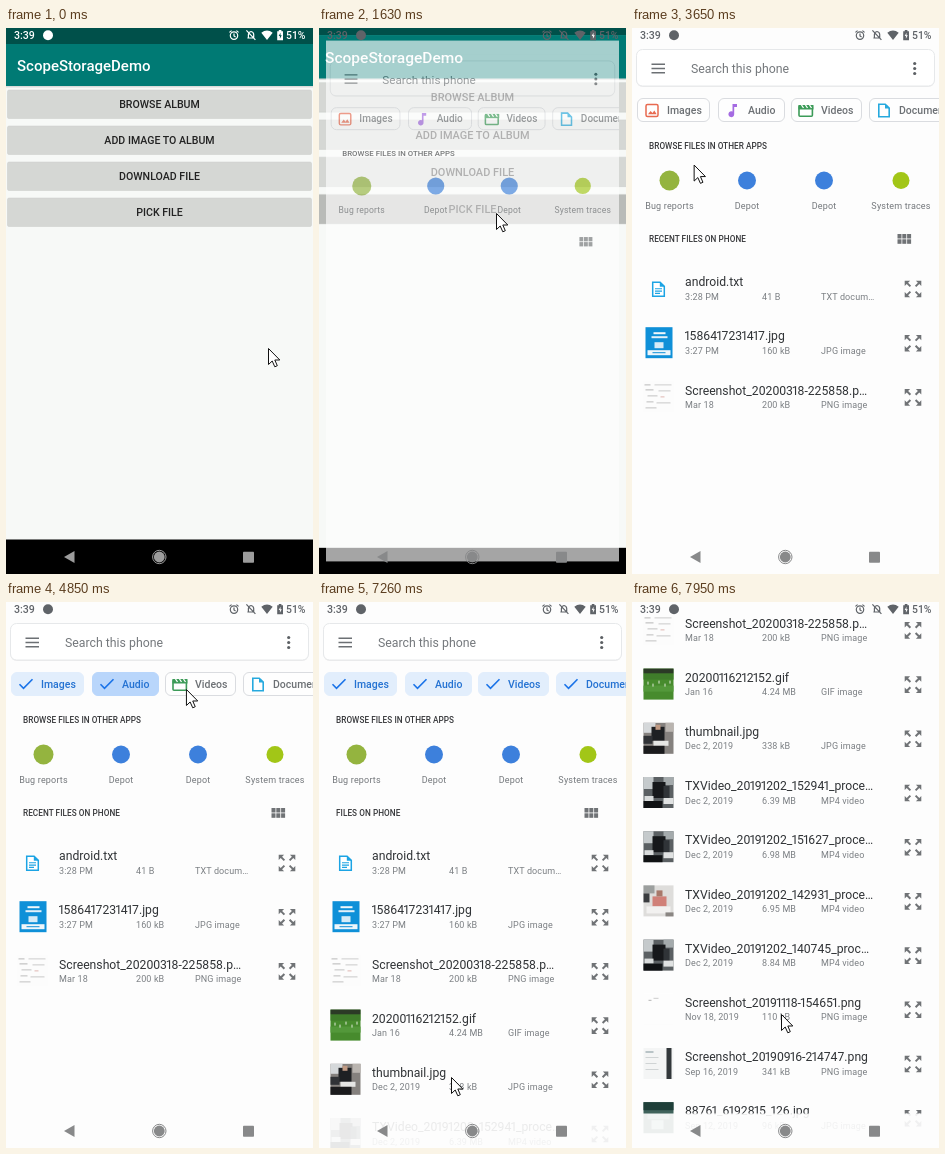
These frames come from a looping animation (307x546 px, 8 s). An HTML page:

```html
<!DOCTYPE html>
<html lang="en">
<head>
<meta charset="utf-8">
<title>File picker demo</title>
<style>
html, body { margin: 0; width: 100%; height: 100%; overflow: hidden; background: #fff; }
svg { display: block; width: 100%; height: 100%; font-family: Roboto, "Noto Sans", sans-serif; cursor: default; }
.med { font-weight: 500; }
.meta { font-size: 9px; letter-spacing: .12px; fill: #7b7f83; }
.app { font-size: 9px; letter-spacing: .18px; fill: #74787c; text-anchor: middle; }
.head { font-size: 8.2px; letter-spacing: .06px; font-weight: 500; fill: #36373a; }
.chip { font-size: 10.5px; font-weight: 500; }
.btn { font-size: 10.6px; font-weight: 500; fill: #222; text-anchor: middle; }
</style>
</head>
<body>
<svg id="stage" viewBox="0 0 307 546"></svg>
<script>
const LOOP = 8000;
const ROW = 54.2;

// Bursts of screen updates: start, end, number of steps
const BURSTS = [[0, 0, 1], [150, 1090, 8], [1360, 2170, 7], [2420, 2850, 4], [3250, 3250, 1],
  [3530, 3910, 4], [4190, 5150, 8], [5400, 6360, 8], [6510, 7530, 9], [7680, 7950, 3]];

// Pointer path: time, x, y, ease-out power (0 = ease in and out)
const PATH = [[0, 262, 320, 0], [1090, 177, 184, 0], [1360, 177, 185, 0], [2280, 177, 185, 0],
  [2850, 121, 414, 0], [3240, 120, 414, 0], [3390, 120, 414, 0], [3910, 51, 86, 2.6],
  [4190, 51, 86, 0], [4590, 117, 86, 0], [4876, 180, 87, 1], [5150, 197, 86, 2],
  [5400, 197, 86, 0], [5800, 265, 85, 0], [5860, 265, 85, 0], [6086, 222, 189, 1],
  [6360, 204, 268, 2], [6500, 204, 268, 0], [7275, 132, 475, 0], [7402, 139, 450, 1], [7530, 149, 412, 1]];

const CHIPS = [
  { name: "Images", x: 5, w: 73, click: 4190, icon: `<rect x="1" y="1.5" width="12" height="12" rx="1.5" fill="none" stroke="#e8694f" stroke-width="1.5"/><path d="M3 11.3l2.6-3.4 1.9 2.2 1.8-2.6 2.4 3.8z" fill="#e8694f"/>` },
  { name: "Audio", x: 86, w: 67, click: 4590, icon: `<path d="M6.5 1h4.5v3H8.2v7.2a2.9 2.9 0 1 1-1.7-2.6z" fill="#a56be2"/>` },
  { name: "Videos", x: 159, w: 71, click: 5400, icon: `<rect x="0" y="2.8" width="13.4" height="10.4" rx="1" fill="none" stroke="#3c9b58" stroke-width="1.6"/><path d="M-.5 2h15v4.5h-15z" fill="#3c9b58"/><path d="M2.5 2l2 3M6.5 2l2 3M10.5 2l2 3" stroke="#fff" stroke-width="1.3"/>` },
  { name: "Documents", x: 237, w: 92, click: 5800, icon: `<path d="M1.8 1.2h6.4l4 4v8.6H1.8z" fill="none" stroke="#26a9de" stroke-width="1.6"/><path d="M8 1.2v4.4h4.2z" fill="#26a9de"/>` }
];

// Thumbnails: flat blocks "colour x y w h" on a 30 x 31 tile
const DESK = "#5b6063 0 0 30 31;#c5cacc 0 0 10 12;#a4aaac 20 0 10 8;#16181b 9 5 13 16;#303438 20 9 6 13;#d9dcdc 1 19 9 5;#101214 0 24 19 7;#e0e2e2 20 21 10 6";
const SHEET = "#fcfcfc 0 0 30 31;#b9b9b9 1 3 6 1;#cdcdcd 11 3 17 1;#b7b7b7 2 8 8 1;#cacaca 15 9 12 1;#c2c2c2 4 14 10 1;#dfb7b2 17 15 4 1;#bdbdbd 3 20 7 1;#c9c9c9 13 21 14 1;#c2c2c2 2 26 11 1";
const FILES = [
  ["android.txt", "3:28 PM", "41 B", "TXT docum…", ""],
  ["1586417231417.jpg", "3:27 PM", "160 kB", "JPG image", "#0f90d8 2 0 27 31;#f0f7fb 10 5 12 2;#e3f1f9 8 9 16 2;#d5ebf7 11 15 9 6;#eef6fb 4 23 23 5;#0f90d8 9 25 13 1"],
  ["Screenshot_20200318-225858.p…", "Mar 18", "200 kB", "PNG image", SHEET],
  ["20200116212152.gif", "Jan 16", "4.24 MB", "GIF image", "#478b2d 0 0 30 31;#2b3a26 0 0 30 5;#3f7d2a 0 5 30 6;#53983a 0 17 30 6;#dfe9d8 4 13 1 3;#dfe9d8 9 15 1 3;#dfe9d8 15 12 1 3;#dfe9d8 21 15 1 3;#dfe9d8 26 12 1 3"],
  ["thumbnail.jpg", "Dec 2, 2019", "338 kB", "JPG image", "#85817e 0 0 30 31;#d5d8da 0 0 12 10;#1e2023 8 4 13 14;#c09a83 12 2 5 5;#303236 0 13 9 8;#e6e6e4 10 18 15 5;#1b1b1d 0 23 21 8;#b9b4af 22 0 8 9"],
  ["TXVideo_20191202_152941_proce…", "Dec 2, 2019", "6.39 MB", "MP4 video", DESK],
  ["TXVideo_20191202_151627_proce…", "Dec 2, 2019", "6.98 MB", "MP4 video", DESK],
  ["TXVideo_20191202_142931_proce…", "Dec 2, 2019", "6.95 MB", "MP4 video", "#dedddb 0 0 30 31;#9c9f9e 0 0 11 8;#3a3c3f 0 8 6 9;#d08078 9 11 14 10;#a8786a 13 5 6 6;#f2f1f0 3 21 24 7;#8a8683 22 27 8 4"],
  ["TXVideo_20191202_140745_proc…", "Dec 2, 2019", "8.84 MB", "MP4 video", DESK],
  ["Screenshot_20191118-154651.png", "Nov 18, 2019", "110 kB", "PNG image", "#fdfdfd 0 0 30 31;#b5b5b5 5 6 3 1;#cecece 10 4 5 1"],
  ["Screenshot_20190916-214747.png", "Sep 16, 2019", "341 kB", "PNG image", "#f4f5f5 0 0 30 31;#b9c4c7 2 3 8 2;#d0d4d5 2 9 13 1;#d0d4d5 2 15 11 1;#d0d4d5 2 21 13 1;#33383b 23 0 5 31"],
  ["88761_6192815_126.jpg", "Sep 12, 2019", "96 kB", "JPG image", "#3f625b 0 0 30 31;#1f3f39 0 0 30 8;#7e9f98 4 12 22 5;#acc4bf 8 18 12 9"]
];

const rect = (x, y, w, h, fill, extra = "") => `<rect x="${x}" y="${y}" width="${w}" height="${h}" fill="${fill}" ${extra}/>`;
const text = (x, y, s, attrs) => `<text x="${x}" y="${y}" ${attrs}>${s}</text>`;
const dot = (x, y, r, fill) => `<circle cx="${x}" cy="${y}" r="${r}" fill="${fill}"/>`;

// File names use a narrow figure one
function narrowOnes(s) {
  return [...s].map((c, i) => (c === "1" ? -1.1 : 0) - (s[i - 1] === "1" ? 1.2 : 0)).join(" ");
}

function thumb(spec) {
  return spec.split(";").map(b => {
    const [fill, x, y, w, h] = b.split(" ");
    return rect(+x + 11.5, +y + 245, w, h, fill);
  }).join("");
}

const docIcon = `<path d="M20.7 254.2h7.4l4.2 4.2v9.8h-11.6z" fill="#fff" stroke="#1ca4e4" stroke-width="1.5"/><path d="M23 260.8h7M23 263.1h7M23 265.4h5" stroke="#1ca4e4" stroke-width="1.1"/><path d="M27.8 254v4.7h4.7z" fill="#1ca4e4"/>`;
const corner = `<path d="M-8.3-8.3h5.4l-2 2 3 3-1.4 1.4-3-3-2 2z"/>`;
const expand = `<g transform="translate(281 261)" fill="#707376">` +
  [0, 90, 180, 270].map(a => `<g transform="rotate(${a})">${corner}</g>`).join("") + `</g>`;

function fileRow([name, date, size, kind, tile], i) {
  return `<g class="row" transform="translate(0 ${i * ROW})">
    <g class="tile">${tile ? thumb(tile) : docIcon}</g>
    ${text(53, 258.3, name, `font-size="12.2" fill="#303336" dx="${narrowOnes(name)}"`)}
    ${text(53, 271.5, date, 'class="meta"')}${text(130, 271.5, size, 'class="meta"')}${text(189, 271.5, kind, 'class="meta"')}
    ${expand}</g>`;
}

function chip({ name, x, w, icon }) {
  return `<g class="pill"><rect x="${x + .5}" y="70.5" width="${w - 1}" height="23" rx="5.5"/>
    <g class="kind" transform="translate(${x + 8} 75)">${icon}</g>
    <path class="tick" d="M${x + 8.5} 82.3l4 4 9-9" fill="none" stroke="#1a73e8" stroke-width="1.6"/>
    ${text(x + 30, 85.8, name, 'class="chip"')}</g>`;
}

const buttons = ["BROWSE ALBUM", "ADD IMAGE TO ALBUM", "DOWNLOAD FILE", "PICK FILE"].map((s, i) =>
  rect(1.5, 62 + 36 * i, 304, 28.5, "#d5d7d4", `rx="1.5" class="face" stroke="#c9cbc8" stroke-width=".5"`) +
  text(153.5, 80 + 36 * i, s, 'class="btn"')).join("");

const home = `<g id="home">${rect(0, 0, 307, 546, "#f7f9f7")}${rect(0, 57, 307, 2.5, "#000", 'opacity=".12"')}
  ${rect(0, 0, 307, 16, "#00504a")}${rect(0, 16, 307, 42, "#007a74")}
  ${text(11, 43.2, "ScopeStorageDemo", 'class="med" font-size="15" fill="#fff"')}
  ${buttons}${rect(0, 511.5, 307, 34.5, "#000")}</g>`;

const grid = [0, 1, 2].map(c => [0, 1].map(r => rect(265.5 + c * 4.8, 206 + r * 5.3, 4, 4.5, "#707376")).join("")).join("");
const apps = [["Bug reports", 37.5, 10, "#94b43f"], ["Depot", 115, 9, "#3d80dc"], ["Depot", 192, 9, "#3d80dc"], ["System traces", 269, 8.5, "#a2c617"]]
  .map(([s, x, r, c]) => dot(x, 152.5, r, c) + text(x, 181.3, s, 'class="app"')).join("");

const picker = `<clipPath id="frame">${rect(0, 0, 307, 546, "#000")}</clipPath>
  <g id="picker" clip-path="url(#frame)">${rect(0, 0, 307, 546, "#fdfdfd")}<g id="page">
  ${rect(4.5, 22.5, 298, 36.5, "#000", 'rx="6" opacity=".06"')}
  ${rect(4.5, 21.5, 298, 36.5, "#fff", 'rx="6" stroke="#e6e8ea"')}
  <path d="M19.5 36.2h13.5M19.5 40.5h13.5M19.5 44.8h13.5" stroke="#6c7074" stroke-width="1.4"/>
  ${text(59, 45.2, "Search this phone", 'font-size="12.3" fill="#74787c"')}
  ${[35.5, 40.5, 45.5].map(y => dot(282.7, y, 1.6, "#5c6064")).join("")}
  ${CHIPS.map(chip).join("")}
  ${text(17, 121.2, "BROWSE FILES IN OTHER APPS", 'class="head"')}
  ${apps}<text id="listHead" x="17" y="214.2" class="head"></text>${grid}
  ${FILES.map(fileRow).join("")}</g>
  ${rect(0, 0, 307, 15, "#fdfdfd")}${rect(0, 511.5, 307, 34.5, "#fdfdfd", 'opacity=".91"')}</g>`;

const status = `<g id="status">${text(8, 11, "3:39", 'class="med" font-size="10.6"')}
  <circle cx="42" cy="7.2" r="5"/>
  <g fill="none" stroke="currentColor" stroke-width="1.2"><circle cx="228" cy="7.6" r="3.7"/><path d="M228 5.4v2.5l1.6 1M223.4 4.4l2.2-1.8M232.6 4.4l-2.2-1.8"/>
  <path d="M241.4 10h6.4M242.4 10V6.5q.2-2.6 2.6-3q2.6.4 2.7 3V10M240.4 2.4l9 9.4"/></g>
  <path d="M255.3 4.7q5.7-4.2 11.4 0L261 11.9zM272.8 2.1h2.6v1.2h1.6v9h-5.8v-9h1.6z"/>
  <path id="bolt" d="M274.5 4.8l-1.8 3.2h1.2v2.8l1.9-3.5h-1.3z"/>
  ${text(280, 11, "51%", 'class="med" font-size="10.4"')}</g>`;

const nav = `<g id="nav"><path d="M58 529l10.5-6v12z"/><circle cx="153.3" cy="529" r="5.4"/>
  <circle cx="153.3" cy="529" r="6.7" fill="none" stroke="currentColor" stroke-width="1"/>${rect(237, 523.7, 11, 11, "currentColor", 'rx=".8"')}</g>`;

const arrow = `<path id="arrow" d="M.5.5V16.5L4.2 13L6.8 18.8L9.3 17.7L6.8 12H11.8Z" fill="#fff" stroke="#111" stroke-width="1" stroke-linejoin="round"/>`;

const $ = id => document.getElementById(id);
$("stage").innerHTML = home + picker + status + nav + arrow;
const faces = document.querySelectorAll(".face");
const pills = document.querySelectorAll(".pill");
const rows = document.querySelectorAll(".row");
const tiles = document.querySelectorAll(".tile");

const clamp = v => Math.min(1, Math.max(0, v));
const show = (el, on) => el.setAttribute("visibility", on ? "inherit" : "hidden");
const zoom = (el, k) => el.setAttribute("transform", `translate(153.5 273) scale(${k}) translate(-153.5 -273)`);

function snap(t) {
  const [a, b, n] = BURSTS.filter(s => s[0] <= t).pop();
  if (n === 1) return a;
  const gap = (b - a) / (n - 1);
  return a + gap * Math.min(n - 1, Math.floor((t - a) / gap + .2));
}

function pointer(t) {
  const i = PATH.findIndex(k => k[0] > t);
  if (i < 0) return PATH[PATH.length - 1].slice(1, 3);
  const [t0, x0, y0] = PATH[i - 1], [t1, x1, y1, pow] = PATH[i];
  const u = (t - t0) / (t1 - t0);
  const e = pow ? 1 - (1 - u) ** pow : u * u * (3 - 2 * u);
  return [x0 + (x1 - x0) * e, y0 + (y1 - y0) * e];
}

// The page follows the drag, then glides on
function scrollAt(t, y) {
  if (t <= 7275) return 0;
  const fling = clamp((t - 7530) / 420);
  return 475 - y + 278 * (1 - (1 - fling) ** 2);
}

function drawChip(el, c, t) {
  const on = t >= c.click, held = on && t < c.click + 480;
  const box = el.querySelector("rect");
  box.setAttribute("fill", held ? "#b9d6fb" : on ? "#e2eefc" : "#fefefe");
  box.setAttribute("stroke", held ? "#b9d6fb" : on ? "#e2eefc" : "#dadce0");
  el.querySelector("text").setAttribute("fill", on ? "#2472d2" : "#6c7074");
  show(el.querySelector(".kind"), !on);
  show(el.querySelector(".tick"), on);
}

function draw(time) {
  const t = snap(time);
  const p = 1 - (1 - clamp((t - 1450) / 400)) ** 2;
  const light = t >= 1600, all = t >= 6630;
  const [x, y] = pointer(t);

  zoom($("home"), 1 + .05 * p);
  zoom($("picker"), .85 + .15 * p);
  $("picker").setAttribute("opacity", clamp((t - 1500) / 200));
  show($("home"), t < 1860);
  faces[3].setAttribute("fill", t >= 1360 ? "#b9bbb8" : "#d5d7d4");

  pills.forEach((el, i) => drawChip(el, CHIPS[i], t));
  $("listHead").textContent = all ? "FILES ON PHONE" : t >= 1890 ? "RECENT FILES ON PHONE" : "";
  rows.forEach((el, i) => show(el, all || (t >= 1890 && i < 3)));
  tiles.forEach((el, i) => show(el, i === 0 || t >= 2030));
  $("page").setAttribute("transform", `translate(0 ${-scrollAt(t, y)})`);

  const ink = light ? "#5f6368" : "#fff";
  $("status").setAttribute("fill", ink);
  $("status").setAttribute("color", ink);
  $("bolt").setAttribute("fill", light ? "#fdfdfd" : "#00504a");
  const key = light ? "#88898a" : "#9c9c9c";
  $("nav").setAttribute("fill", key);
  $("nav").setAttribute("color", key);
  $("arrow").setAttribute("transform", `translate(${x} ${y})`);
}

const start = performance.now();
function tick() {
  draw((performance.now() - start) % LOOP);
  requestAnimationFrame(tick);
}
tick();
</script>
</body>
</html>
```
